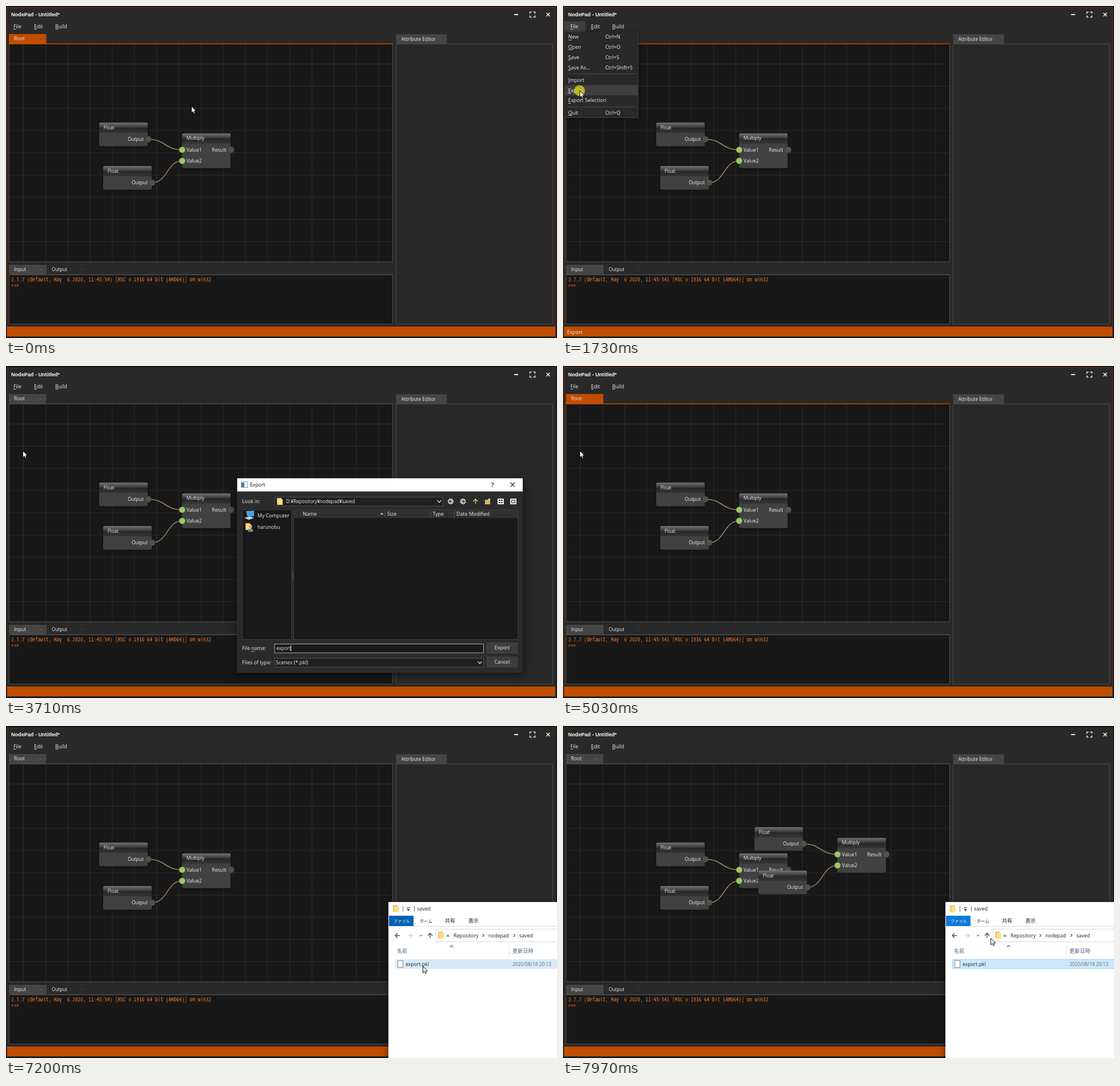
An HTML page with a canvas that plays this animation: 964 px wide and 581 px high, repeating every 8000 ms.

```html
<!DOCTYPE html>
<html lang="en">
<head>
<meta charset="utf-8">
<title>Node editor export</title>
<style>
html, body { margin: 0; width: 100%; height: 100%; overflow: hidden; background: #141414; }
canvas { display: block; width: 964px; height: 581px; }
</style>
</head>
<body>
<canvas id="stage" width="964" height="581"></canvas>
<script>
const ctx = document.getElementById('stage').getContext('2d');
const LOOP = 8000, TICK = 105;
const UI = '"Open Sans", "Noto Sans", sans-serif';
const JP = '"Noto Sans CJK JP", "Noto Sans CJK", sans-serif';
const MONO = '"Noto Sans Mono CJK JP", "Noto Sans Mono", monospace';
const ORANGE = '#c04d00', EDGE = '#4c4c4c', DARK = '#181818', PANEL = '#292929', TAB = '#454545';

// Pointer moves: start time, number of ticks, end point
const moves = [
  [0, 1, 324, 175], [200, 2, 20, 35], [760, 7, 29, 148], [5250, 5, 20, 30], [5910, 3, 484, 307],
  [6450, 1, 740, 462], [6770, 5, 729, 420], [7560, 3, 450, 236], [7860, 2, 748, 371]
];

const during = (t, a, b) => t >= a && t < b;
const clamp = (v, lo, hi) => Math.max(lo, Math.min(hi, v));
// Progress from 0 to 1 in n hard steps, the first one at start
const progress = (t, start, n) => clamp(Math.floor((t - start) / TICK) + 1, 0, n) / n;

function pointerAt(t) {
  return moves.reduce(([x, y], [start, n, toX, toY]) => {
    const k = progress(t, start, n);
    return [x + (toX - x) * k, y + (toY - y) * k];
  }, [324, 175]).map(Math.round);
}

function rect(x, y, w, h, fill) {
  ctx.fillStyle = fill;
  ctx.fillRect(x, y, w, h);
}
function frame(x, y, w, h, fill, stroke) {
  rect(x, y, w, h, stroke);
  rect(x + 1, y + 1, w - 2, h - 2, fill);
}
function path(points, color, width = 1, fill) {
  ctx.beginPath();
  for (let i = 0; i < points.length; i += 2) ctx.lineTo(points[i], points[i + 1]);
  if (fill) {
    ctx.closePath();
    ctx.fillStyle = fill;
    ctx.fill();
  }
  if (color) {
    ctx.strokeStyle = color;
    ctx.lineWidth = width;
    ctx.stroke();
  }
}
function disc(x, y, r, fill) {
  ctx.beginPath();
  ctx.arc(x, y, r, 0, Math.PI * 2);
  ctx.fillStyle = fill;
  ctx.fill();
}
// Text is placed by its left edge and the middle of its capitals
function text(s, x, y, size = 8.8, color = '#eee', font = UI, weight = '') {
  ctx.font = `${weight} ${size}px ${font}`;
  ctx.fillStyle = color;
  ctx.fillText(s, x, y + size * 0.36);
  return ctx.measureText(s).width;
}
function mnemonic(s, x, y, i = 0) {
  text(s, x, y);
  const start = x + ctx.measureText(s.slice(0, i)).width;
  rect(start, Math.round(y + 4.5), ctx.measureText(s[i]).width, 1, '#bbb');
}
function shadowed(blur, draw) {
  ctx.save();
  ctx.shadowColor = 'rgba(0,0,0,.55)';
  ctx.shadowBlur = blur;
  ctx.shadowOffsetY = blur / 4;
  draw();
  ctx.restore();
}
function cross(x, y, r, color, width) {
  path([x - r, y - r, x + r, y + r], color, width);
  path([x - r, y + r, x + r, y - r], color, width);
}
function chevron(x, y, color, r = 3.5, dir = 1) {
  path([x - r, y - dir * r / 2, x, y + dir * r / 2, x + r, y - dir * r / 2], color, 1.3);
}
function arrow(x, y, dx, dy, color, s = 4) {
  path([x - dx * s, y - dy * s, x + dx * s, y + dy * s], color, 1.3);
  path([x + dy * s, y + dx * s, x + dx * s, y + dy * s, x - dy * s, y - dx * s], color, 1.3);
}
function folder(x, y) {
  rect(x, y, 8, 12, '#f0c65c');
  rect(x + 2, y + 2, 8, 10, '#fbdc84');
}
function tab(label, x, y, w, size, fill, dash) {
  rect(x, y, w, 18, fill);
  text(label, x + 9, y + 8.4, size);
  if (dash) rect(x + w - 14, y + 8, 6, 1, dash);
}

function drawWindow(t, focused) {
  rect(0, 0, 964, 581, '#141414');
  frame(1, 2, 961, 577, PANEL, focused ? '#713308' : '#303030');
  text('NodePad - Untitled*', 9, 15, 9.1, '#fff', '"Liberation Sans", Arial, sans-serif', 'bold');
  rect(889, 14, 7, 2, '#eee');
  for (const sx of [-1, 1])
    for (const sy of [-1, 1]) {
      const x = 921 + sx * 4.5, y = 15 + sy * 4.5;
      path([x - sx * 3, y, x, y, x, y - sy * 3], '#eee', 1.4);
    }
  cross(948.5, 15, 3, '#eee', 1.6);

  if (during(t, 310, 1840) || during(t, 5570, 5910)) rect(2, 27, 37, 18, '#404040');
  mnemonic('File', 13, 35.5);
  mnemonic('Edit', 49, 35.5);
  mnemonic('Build', 86, 35.5);

  const accent = focused ? ORANGE : TAB;
  tab('Root', 5, 49, 65.5, 8.6, accent, focused ? '#8b4414' : '#606060');
  frame(5, 66, 672, 382, DARK, EDGE);
  rect(5, 65.5, 672, 1.5, focused ? ORANGE : EDGE);
  for (let x = 30; x < 676; x += 38.83) rect(x, 67, 1, 380, '#2c2c2c');
  for (let y = 101; y < 447; y += 38.87) rect(6, y, 670, 1, '#2c2c2c');

  tab('Attribute Editor', 682.5, 49.7, 89, 8.4, TAB);
  frame(682, 66, 275, 491, PANEL, EDGE);
  tab('Input', 5, 453, 66, 8.6, TAB, '#606060');
  tab('Output', 71, 453, 73, 8.2, PANEL, '#404040');
  frame(5, 470, 672, 87, DARK, EDGE);
  rect(5, 469.5, 672, 1.5, '#505050');
  text('3.7.7 (default, May  6 2020, 11:45:54) [MSC v.1916 64 bit (AMD64)] on win32', 9, 479, 9.33, '#f07828', MONO);
  text('>>>', 9, 488.5, 9.33, '#f07828', MONO);

  rect(2, 561, 959, 17, ORANGE);
  for (let i = 0; i < 3; i++)
    for (let j = 0; j <= i; j++) rect(959 - j * 2.5, 571 + i * 2.5, 1.2, 1.2, '#7a6a60');
}

function box(title, x, y, h) {
  ctx.save();
  shadowed(3, () => {
    ctx.beginPath();
    ctx.roundRect(x, y, 85, h, 3);
    ctx.fillStyle = '#414141';
    ctx.fill();
  });
  ctx.clip();
  const head = ctx.createLinearGradient(0, y, 0, y + 18);
  head.addColorStop(0, '#727272');
  head.addColorStop(0.48, '#383838');
  head.addColorStop(0.52, '#282828');
  head.addColorStop(1, '#343434');
  rect(x, y, 85, 18, head);
  ctx.restore();
  text(title, x + 7.7, y + 8.7, 8.4);
}
function port(x, y, input) {
  disc(x, y, 5.5, input ? '#6c9248' : '#3c463c');
  disc(x, y, 4.9, input ? '#9acb65' : '#4a564a');
}
function wire(x1, y1, x2, y2) {
  const mid = (x1 + x2) / 2;
  ctx.beginPath();
  ctx.moveTo(x1, y1);
  ctx.bezierCurveTo(mid, y1, mid, y2, x2, y2);
  ctx.strokeStyle = '#9b8062';
  ctx.lineWidth = 1.6;
  ctx.stroke();
}
function floatNode(x, y) {
  box('Float', x, y, 41.5);
  text('Output', x + 50, y + 29.2, 8.4);
  port(x + 86, y + 29.2);
}
function graph(dx, dy) {
  ctx.save();
  ctx.translate(dx, dy);
  wire(249, 233.2, 308, 251.7);
  wire(256, 309.2, 308, 271);
  box('Multiply', 308, 222.7, 61);
  for (const [i, y] of [251.7, 271].entries()) {
    text('Value' + (i + 1), 316, y, 8.5);
    port(308.3, y, true);
  }
  text('Result', 360, 251.7, 8.8);
  port(394, 251.7);
  floatNode(163, 204);
  floatNode(170, 280);
  ctx.restore();
}

function drawMenu(pointerY) {
  shadowed(5, () => rect(3, 45, 129, 151, '#3c3c3c'));
  rect(4, 45, 127, 150, PANEL);
  let y = 54;
  for (const item of 'New|Ctrl+N,Open|Ctrl+O,Save|Ctrl+S,Save As...|Ctrl+Shift+S,-,Import,Export,Export Selection,-,Quit|Ctrl+Q'.split(',')) {
    if (item === '-') {
      rect(8, Math.round(y - 7.5), 120, 1, '#4a4a4a');
      y += 3.6;
      continue;
    }
    const [label, key] = item.split('|');
    if (Math.abs(y - pointerY) < 9) {
      rect(4, y - 9, 127, 18, '#3f3f3f');
      text(label, 7, 570.5);
    }
    mnemonic(label, 9, y);
    if (key) text(key, 74, y);
    y += 17.95;
  }
}

function button(label, y, on) {
  frame(841, y, 54, 19, on ? '#3d3d3d' : '#2c2c2c', on ? '#444' : '#313131');
  ctx.textAlign = 'center';
  text(label, 868, y + 9.3, 8.7, on ? '#eee' : '#666');
  ctx.textAlign = 'left';
}
function combo(x, y, w) {
  frame(x, y, w, 16.5, '#202020', '#505050');
  chevron(x + w - 7, y + 8, '#ddd');
}
function drawToolbar() {
  for (const [x, dir] of [[778, -1], [799.5, 1]]) {
    disc(x, 237, 5, '#c4c4c4');
    arrow(x, 237, dir, 0, '#3a3a3a', 2.5);
  }
  arrow(821.5, 237, 0, -1, '#e6d58a');
  rect(838, 234, 9, 8, '#d3b873');
  rect(844, 232, 3, 3, '#f3e49d');
  for (const x of [860, 882]) rect(x, 232, 11, 10, '#eee');
  for (const x of [862, 866])
    for (const y of [234, 238]) rect(x, y, 3, 2, '#333');
  frame(884, 234, 7, 6, '#ddd', '#333');
}

function drawDialog(t, alpha) {
  ctx.save();
  ctx.globalAlpha = alpha;
  const k = 0.94 + alpha * 0.06;
  ctx.translate(654, 366);
  ctx.scale(k, k);
  ctx.translate(-654, -366);
  shadowed(14, () => rect(404, 196.5, 500.5, 340.5, '#2b2b2b'));
  rect(404.5, 196.5, 499.5, 23, '#fff');
  frame(411, 202, 12, 11, '#f4f4f4', '#8a9bab');
  rect(412, 204, 5, 8, '#3f7f9c');
  text('Export', 427, 208.2, 8.7, '#111');
  text('?', 849, 208, 10, '#111', UI, '600');
  cross(886.3, 207.8, 3.8, '#222', 1.1);

  text('Look in:', 413, 237);
  combo(470, 229, 295);
  folder(474, 231);
  text('D:¥Repository¥nodepad¥saved', 490, 237, 8.25);
  drawToolbar();

  frame(413, 251, 87, 228, '#191919', '#3b3b3b');
  path([420, 254, 434, 253, 434, 263, 422, 263], null, 1, '#4ba3e3');
  path([417, 266, 426, 263, 434, 266, 425, 269], null, 1, '#cbd9e2');
  text('My Computer', 440, 261.8, 8.75);
  folder(419, 275);
  disc(428, 281, 2.7, '#c9a27c');
  rect(424, 285, 8, 5, '#6f8ea0');
  text('harunobu', 440, 282, 8.5);
  for (let y = 359; y < 373; y += 2.5) rect(501, y, 1.5, 1.2, '#777');

  frame(503, 251, 393, 228, '#191919', '#3b3b3b');
  rect(504, 252, 391, 14, '#303030');
  for (const [label, x] of [['Name', 519], ['Size', 667], ['Type', 746.5], ['Date Modified', 788]]) {
    text(label, x, 258.7);
    if (x > 519) rect(x - 4, 252, 1, 14, '#4a4a4a');
  }
  path([654.5, 260, 657.5, 256.5, 660.5, 260], null, 1, '#bbb');

  const count = clamp(1 + Math.floor((t - 3050) / 130), 0, 6);
  mnemonic('File name:', 413, 494, 5);
  frame(469.5, 486, 366.5, 16.5, '#191919', '#aaa');
  const end = 473 + text('export'.slice(0, count), 473, 494, 8.2);
  if (!during(t, 2400, 2940)) rect(Math.round(end), 489, 1, 10, '#eee');
  button('Export', 484, count > 0);
  text('Files of type:', 413, 518.7);
  combo(469.5, 511, 366.5);
  text('Scenes (*.pkl)', 472, 518.7, 9);
  button('Cancel', 508.5, true);
  ctx.restore();
}

function drawExplorer(t) {
  const active = t >= 7450;
  const ink = '#222';
  shadowed(12, () => rect(669, 308, 310, 290, '#fff'));
  folder(677, 313.5);
  for (const x of [694, 714]) rect(x, 315, 1, 10, '#777');
  path([701, 320.5, 707, 320.5, 704, 323.5], null, 1, ink);
  rect(701, 317.5, 6, 1, ink);
  text('saved', 719, 320, 8.8, ink);
  rect(670, 332, 43, 18, active ? '#0c7ad9' : '#0063b1');
  text('ファイル', 678, 341, 7.2, '#fff', JP);
  text('ホーム', 724, 341, 7.3, ink, JP);
  text('共有', 768, 341, 9, ink, JP);
  text('表示', 809, 341, 9, ink, JP);
  rect(670, 350, 294, 1, '#dcdcdc');

  arrow(685, 366.7, -1, 0, '#444');
  arrow(707, 366.7, 1, 0, '#ccc');
  chevron(726, 366.5, t >= 7965 ? '#3a9be0' : '#888', 2);
  arrow(742, 366.7, 0, -1, '#444');
  frame(752, 355, 220, 23, '#fff', '#d9d9d9');
  folder(756, 360);
  text('«', 770.5, 366, 10.5, ink);
  text('Repository', 783, 366.7, 8.8, ink);
  text('nodepad', 844, 366.7, 8.6, ink);
  text('saved', 898, 366.7, 8.8, ink);
  for (const x of [835, 889]) path([x - 1, 364, x + 1.5, 366.5, x - 1, 369], '#555', 1.1);

  chevron(779.5, 385.5, '#777', 3, -1);
  text('名前', 684, 393.5, 9, '#4c607a', JP);
  text('更新日時', 886, 393.5, 9.2, '#4c607a', JP);
  rect(880, 384, 1, 20, '#e3e3e3');
  if (active) frame(681, 408, 290, 17, '#cce8ff', '#9bd2fb');
  else if (t >= 6980) rect(681, 408, 283, 17, '#d8eaf7');
  frame(685, 410, 10, 13, '#fff', '#8c8c8c');
  text('export.pkl', 699, 416.5, 8.7, ink);
  text('2020/08/18 20:13', 886, 416.5, 8.4, '#6d6d6d');
}

function drawPointer(x, y) {
  ctx.save();
  ctx.translate(x + 0.5, y + 0.5);
  path([0, 0, 0, 11.5, 2.6, 9.2, 4.4, 13, 6.3, 12.2, 4.6, 8.4, 8.2, 8.2], '#000', 0.9, '#fff');
  ctx.restore();
}

function draw(t) {
  const [x, y] = pointerAt(t);
  const focused = !during(t, 1950, 4365) && t < 6450;
  const alpha = progress(t, 1950, 3) - progress(t, 4260, 2);
  drawWindow(t, focused);
  graph(0, 0);
  if (t >= 7860) graph(172, -27);
  if (during(t, 650, 1840)) drawMenu(y);
  if (alpha > 0) drawDialog(t, alpha);
  if (t >= 6450) drawExplorer(t);
  if (during(t, 540, 760) || during(t, 1630, 1840)) disc(x, y, 9.5, 'rgba(208,208,24,.78)');
  drawPointer(x, y);
}

function tick(now) {
  draw(now % LOOP);
  requestAnimationFrame(tick);
}
draw(0);
requestAnimationFrame(tick);
</script>
</body>
</html>
```
